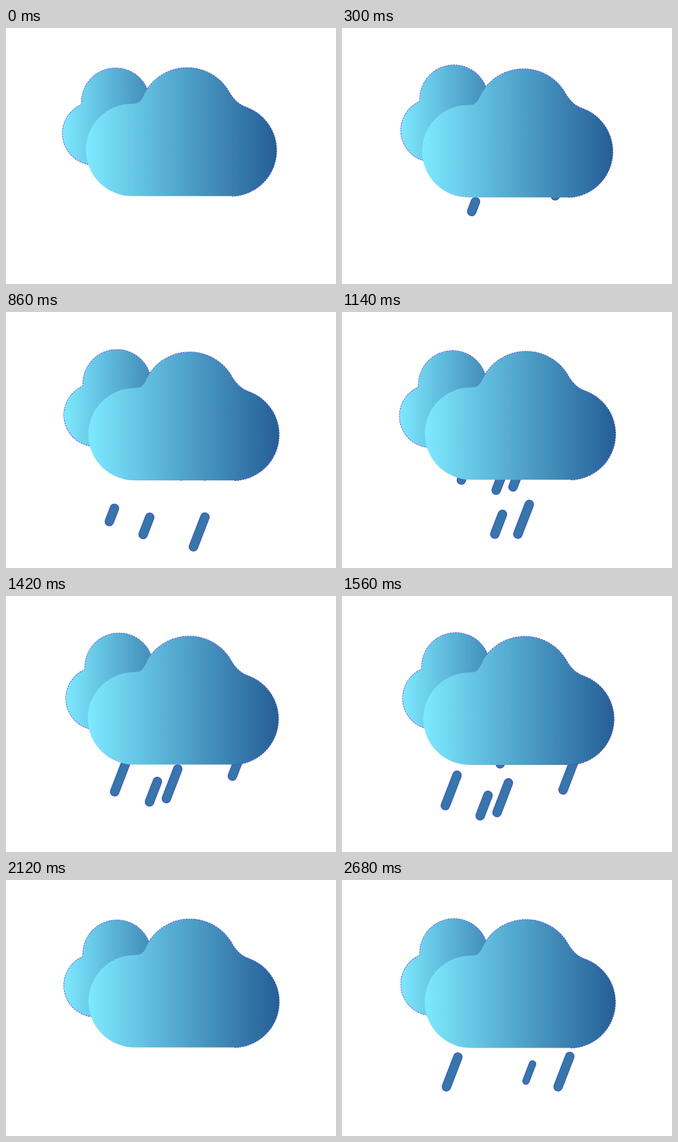
An HTML page that plays this animation: 500 px wide and 388 px high, repeating every 2.7 s.

```html
<!DOCTYPE html>
<html lang="en">
<head>
<meta charset="utf-8">
<title>Rain clouds</title>
<style>
html, body { margin: 0; width: 100%; height: 100%; overflow: hidden; background: #fff; }
svg { display: block; width: 500px; height: 388px; }
.rim { fill: none; stroke: #4238ee; stroke-width: 1.3; stroke-dasharray: 3 1; }
line { stroke-linecap: round; }
</style>
</head>
<body>
<svg viewBox="0 0 500 388">
  <defs>
    <linearGradient id="far" gradientUnits="userSpaceOnUse" x1="85" x2="283">
      <stop stop-color="#7de9ff"/><stop offset="1" stop-color="#245e96"/>
    </linearGradient>
    <linearGradient id="near" gradientUnits="userSpaceOnUse" x1="122" x2="411">
      <stop stop-color="#7de9ff"/><stop offset="1" stop-color="#245e96"/>
    </linearGradient>
  </defs>
  <g id="rain"></g>
  <path class="rim back"/>
  <path class="rim front"/>
  <path class="body back" fill="url(#far)"/>
  <path class="body front" fill="url(#near)"/>
</svg>
<script>
const LOOP = 2700, SLOPE = 0.385, LANE_Y = 269, BASE = 247, END = 360;
const REST = 46, CYCLE = 2 * Math.PI / REST;

// "rim" is the part of an outline with the thin blue edge.
const puffs = "M133 208A47.5 47.5 0 0 1 113 117.5C114 116.5 114.5 115 114.5 113A51.5 51.5 0 0 1 217.5 113";
const crown = "C198 115 203 114 207.5 105A73 73 0 0 1 338.5 98" +
  "C345 109 352 116 364 120.5A69.3 69.3 0 0 1 342 255";

// Each cloud sways on a slow wave and one twice as fast, with a slight drift.
const clouds = {
  back: {
    rim: puffs,
    body: puffs + "L200 208Z",
    x: (c, s, c2, n) => 2.5 - 2.4 * c2 + 0.045 * n,
    y: (c, s, c2) => c - s + 2.5 * c2 - 4.2
  },
  front: {
    rim: "M190 115" + crown,
    body: "M192 255A70 70 0 0 1 190 115" + crown + "Z",
    x: (c, s, c2, n) => 0.4 - 1.3 * c + 0.4 * s + 0.9 * c2 + 0.087 * n,
    y: (c, s, c2, n) => 1 + 0.5 * s - 1.2 * c2 - 0.022 * n
  }
};

// Drops sharing a speed (px per step): [lane x, length, step it leaves the cloud, width]
const showers = [
  { fall: 8.2, drops: [[200, 15, 3.2], [234, 26, 8], [175.3, 20, 10.4]] },
  { fall: 14.7, drops: [[317.5, 45, 6.5], [317.5, 45, 11.6], [257.6, 30, 18.9],
                        [292.5, 45, 18.9], [234, 45, 33.5]] },
  { fall: 7, drops: [[234, 31, 21.7], [257.6, 45, 22.4], [175.3, 46, 23.9], [344.5, 46, 27.3]] },
  { fall: 17, drops: [[175.3, 45, 46.1], [344.5, 46, 46.1], [292.5, 26, 46.6, 11]] }
];

function addLine(stroke, width) {
  const el = document.createElementNS("http://www.w3.org/2000/svg", "line");
  el.setAttribute("stroke", stroke);
  el.setAttribute("stroke-width", width);
  return document.getElementById("rain").appendChild(el);
}

const drops = showers.flatMap(({ fall, drops }) =>
  drops.map(([lane, len, born, width = 14.2]) => ({
    fall, lane, len, born,
    lines: [addLine("#3c38de", width), addLine("#3576ab", width - 1.5)]
  })));

for (const name in clouds) {
  const cloud = clouds[name];
  cloud.paths = document.querySelectorAll("." + name);
  for (const el of cloud.paths) el.setAttribute("d", cloud[el.classList[0]]);
}

// Steps come in threes: one long (100 ms), two short (20 ms), with one rest of 420 ms.
function stepAt(t) {
  const s = t - 20;
  if (s < 0) return 0;
  const r = s % 140;
  const n = 1 + 3 * Math.floor(s / 140) + (r < 100 ? 0 : r < 120 ? 1 : 2);
  return n <= REST ? n : Math.max(REST, n - 8);
}

function moveDrop({ fall, lane, len, born, lines }, n) {
  const head = BASE + (n - born) * fall, tail = head - len;
  const xAt = y => lane - (y - LANE_Y) * SLOPE;
  const shown = n > born && head < END;
  for (const el of lines) {
    el.setAttribute("visibility", shown ? "visible" : "hidden");
    el.setAttribute("x1", xAt(tail));
    el.setAttribute("y1", tail);
    el.setAttribute("x2", xAt(head));
    el.setAttribute("y2", head);
  }
}

function draw(t) {
  const n = stepAt(t), a = n * CYCLE;
  const wave = [Math.cos(a), Math.sin(a), Math.cos(2 * a), n];
  for (const { x, y, paths } of Object.values(clouds))
    for (const el of paths)
      el.setAttribute("transform", `translate(${x(...wave)} ${y(...wave)})`);
  for (const drop of drops) moveDrop(drop, n);
}

const start = performance.now();
function tick() {
  draw((performance.now() - start) % LOOP);
  requestAnimationFrame(tick);
}
tick();
</script>
</body>
</html>
```
